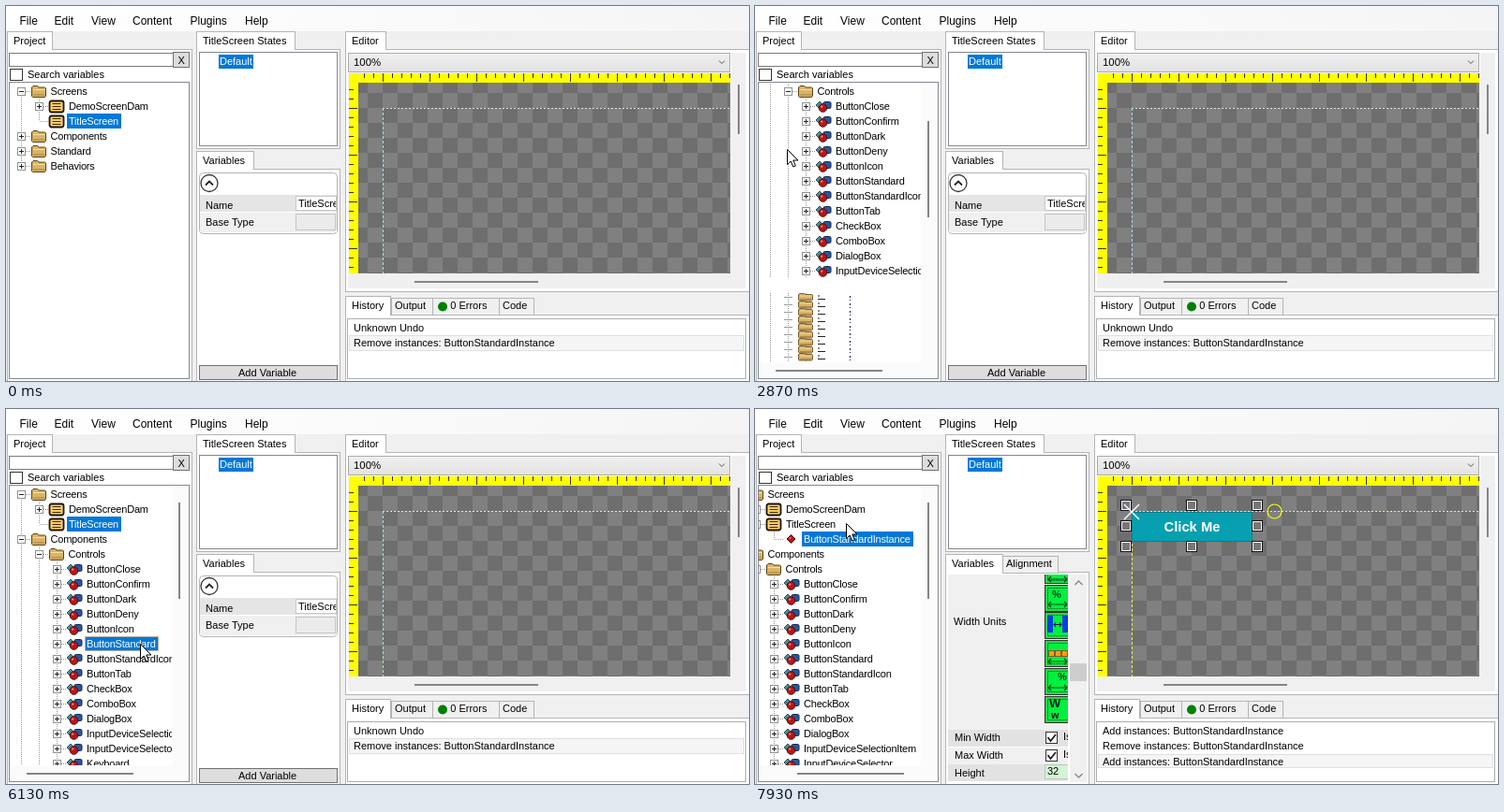
Animation, 793 px wide and 401 px high, one loop 8 s. Source, as an HTML page:

```html
<!DOCTYPE html>
<html lang="en">
<head>
<meta charset="utf-8">
<title>Screen editor</title>
<style>
html,body{margin:0;width:100%;height:100%;overflow:hidden;background:#f0f0f0}
svg{display:block;width:793px;height:401px;font:11px "Liberation Sans",Arial,sans-serif}
text{white-space:pre}
.tree text{letter-spacing:-.2px}
.crisp{shape-rendering:crispEdges}
</style>
</head>
<body>
<svg id="stage" viewBox="0 0 793 401" xmlns="http://www.w3.org/2000/svg"></svg>
<script>
const LOOP = 8000, TICK = 1000 / 15, BLUE = '#0078d7', EDGE = '#b4b4b4';
const stage = document.getElementById('stage');

// Markup helpers
const rect = (x, y, w, h, fill, stroke, extra = '') => stroke
  ? `<rect x="${x + .5}" y="${y + .5}" width="${w - 1}" height="${h - 1}" fill="${fill}" stroke="${stroke}" ${extra}/>`
  : `<rect x="${x}" y="${y}" width="${w}" height="${h}" fill="${fill}" ${extra}/>`;
const text = (x, y, s, fill = '#000', extra = '') => `<text x="${x}" y="${y}" fill="${fill}" ${extra}>${s}</text>`;
const path = (d, stroke, width = 1, extra = '') => `<path d="${d}" fill="none" stroke="${stroke}" stroke-width="${width}" ${extra}/>`;
const clip = (id, x, y, w, h) => `<clipPath id="${id}">${rect(x, y, w, h, '#000')}</clipPath>`;
const repeat = (n, f) => Array.from({length: n}, (_, i) => f(i)).join('');
const layer = (id, extra = '') => `<g id="${id}" ${extra}></g>`;

const tab = (x, y, w, label, active = true) =>
  rect(x, active ? y : y + 2, w, active ? 20 : 19, active ? '#fff' : '#f0f0f0', EDGE) +
  text(x + (active ? 7 : 4), y + 14, label) + (active ? rect(x + 1, y + 18, w - 2, 3, '#fff') : '');
const panel = (x, y, w, h) => rect(x, y, w, h, '#fff', EDGE);

function frameMarkup() {
  const menu = [[14.5, 'File'], [51.5, 'Edit'], [91, 'View'], [135, 'Content'], [196.5, 'Plugins'], [255, 'Help']];
  return rect(0, 0, 793, 401, '#f0f0f0') + rect(0, 0, 793, 27, 'url(#menu)') +
    menu.map(([x, s]) => text(x, 20, s, '#000', 'font-size="12"')).join('') +
    // Project
    panel(1, 46, 198, 356) + tab(1, 27, 49, 'Project') +
    rect(3, 50, 176, 15, '#fff', '#7a7a7a') + rect(178, 49, 18, 17, '#ddd', '#707070') + text(183.5, 61.5, 'X') +
    rect(4, 67, 14, 13, '#fff', '#333') + text(23, 77, 'Search variables') +
    rect(3, 81, 193, 318, '#fff', '#828790') +
    // States
    panel(203, 46, 154, 107) + tab(203, 27, 106, 'TitleScreen States') +
    rect(206, 49, 148, 101, '#fff', '#828790') + rect(227, 52, 37, 15, BLUE) + text(228, 63, 'Default', '#fff') +
    // Variables
    panel(203, 174, 154, 228) + tab(203, 155, 62, 'Variables') + layer('variables') +
    // Editor
    panel(362, 46, 432, 260) + tab(362, 27, 44, 'Editor') +
    rect(365, 72, 425, 230, '#f0f0f0') + rect(774, 50, 16, 22, '#f0f0f0') +
    rect(365, 50, 408, 21, 'url(#combo)', '#acacac') + text(371, 64, '100%', '#000', 'font-size="11.4"') +
    path('M761 58.5l3 3 3-3', '#555') + canvasMarkup() + layer('design') +
    rect(781, 84, 2, 53, '#858585') + rect(436, 294, 132, 2, '#858585') +
    // History
    panel(362, 330, 432, 72) + tab(411, 310, 45, 'Output', false) + tab(455, 310, 72, '     0 Errors', false) +
    tab(526, 310, 38, 'Code', false) + tab(362, 310, 49, 'History') +
    '<circle cx="466" cy="321.500" r="5" fill="#008000"/>' +
    rect(364, 334, 426, 65, '#fff', '#abadb3') + layer('history');
}

function canvasMarkup() {
  const ticks = (n, f) => repeat(n, i => f(i, i % 5 === 2 ? 9 : 5));
  return rect(366, 72, 407, 214, '#ff0') + rect(376, 82, 397, 204, 'url(#checker)') +
    path(ticks(40, (i, len) => `M${382.5 + i * 10} 72v${len}`), '#333', 1, 'class="crisp"') +
    path(ticks(20, (i, len) => `M366 ${89.5 + i * 10}h${len}`), '#333', 1, 'class="crisp"') +
    path('M402 109.500H773', '#dce4e8', 1, 'stroke-dasharray="2 2"');
}

function variablesMarkup(full) {
  if (!full) return rect(206, 178, 148, 66, '#fff', '#b4b4b4', 'rx="4"') +
    rect(207, 202, 146, 18, '#e5e5e5') + rect(207, 221, 146, 21, '#f0f0f0') +
    '<circle cx="217" cy="189.500" r="9" fill="#fff" stroke="#333" stroke-width="1.300"/>' +
    path('M213 191.500l4-4 4 4', '#222', 1.8) +
    text(213, 217, 'Name') + text(213, 235, 'Base Type') +
    rect(309, 203, 44, 16, '#fff', '#c8c8c8') + text(312, 215, 'TitleScreen', '#000', 'clip-path="url(#valueClip)"') +
    rect(309, 222, 43, 18, '#ebebeb', '#c4c4c4') +
    rect(206, 384, 148, 16, '#ddd', '#707070') + text(248, 396, 'Add Variable');
  const button = y => rect(309, y, 30, 29, '#28d848', '#333') +
    rect(312, y + 3, 30, 23, '#00f040', '#067a20', 'stroke-dasharray="2 1"');
  const arrow = y => path(`M313 ${y}H333M316 ${y - 3}l-3 3 3 3M330 ${y - 3}l3 3-3 3`, '#041', 1.2);
  const check = (y, label) => text(213, y + 12, label) + rect(310, y + 2, 13, 13, '#fff', '#333') +
    path(`M312.500 ${y + 8}l3 4 5.500-7`, '#222', 1.8) + text(329, y + 11, 'Is');
  return tab(264, 155, 60, 'Alignment', false) + `<g clip-path="url(#gridClip)">` +
    rect(206, 177, 130, 166, '#f0f0f0') + text(212, 231, 'Width Units') +
    button(158) + button(188) + button(217) + button(247) + button(277) + button(307) +
    arrow(182) + text(317, 202, '%', '#042', 'font-weight="bold"') + arrow(209) +
    rect(312, 221, 6, 18, '#0640e0') + rect(328, 221, 6, 18, '#0640e0') +
    path('M319 230.500h8M321 228l-2 2.500 2 2.500M325 228l2 2.500-2 2.500', '#013') +
    repeat(3, i => rect(313 + i * 7, 258, 7, 7, '#ffa000', '#853')) + arrow(270) +
    text(323, 290, '%', '#042', 'font-weight="bold"') + arrow(298) +
    text(314, 319, 'W', '#021', 'font-weight="bold" font-size="13"') + text(316, 331, 'w', '#021', 'font-weight="bold"') +
    rect(206, 343, 130, 18, '#e2e2e2') + rect(206, 362, 130, 18, '#f0f0f0') + rect(206, 380, 130, 18, '#e2e2e2') +
    check(343, 'Min Width') + check(362, 'Max Width') + text(213, 393, 'Height') +
    rect(309, 380, 28, 16, '#d4f4d4', '#b4c8b4') + text(312, 391, '32') + '</g>' +
    rect(336, 177, 18, 222, '#f0f0f0') + rect(336, 272, 18, 19, '#cdcdcd') +
    path('M341.500 188l4-4 4 4M341.500 390l4 4 4-4', '#888', 1.3);
}

function designMarkup(placed) {
  const guide = path('M402.500 109V286', placed ? '#f0f060' : '#a8dce4', 1, 'stroke-dasharray="3 2"');
  if (!placed) return guide;
  const spots = [[396, 103], [466, 103], [536, 103], [396, 125], [536, 125], [396, 147], [466, 147], [536, 147]];
  return guide + rect(402, 110, 129, 32, '#06a0b0', '#04808e') +
    text(466.5, 131, 'Click Me', '#fff', 'font-size="14.800" font-weight="bold" text-anchor="middle"') +
    spots.map(([x, y]) => rect(x - 6, y - 6, 12, 12, '#111') + rect(x - 5, y - 5, 10, 10, '#777', '#fff')).join('') +
    path('M394 102l16 16M410 102l-16 16', '#fff', 1.4) +
    '<circle cx="554.500" cy="109.500" r="7.500" fill="none" stroke="#ff0" stroke-width="1.200"/>';
}

function historyMarkup(added) {
  const lines = added
    ? [[348, 'Add instances: '], [364, 'Remove instances: '], [381, 'Add instances: ']]
    : [[348, 'Unknown Undo'], [364, 'Remove instances: ']];
  return rect(366, added ? 369 : 352, 422, added ? 15 : 17, '#f5f5f5', '#e0e0e0') +
    lines.map(([y, s]) => text(371, y, s + (s.endsWith(' ') ? 'ButtonStandardInstance' : ''))).join('');
}

// Tree rows: [depth, icon, label, expander]
const controls = ('ButtonClose ButtonConfirm ButtonDark ButtonDeny ButtonIcon ButtonStandard ButtonStandardIcon ' +
  'ButtonTab CheckBox ComboBox DialogBox InputDeviceSelectionItem InputDeviceSelector Keyboard Label ListBox ' +
  'ListBoxItem Menu MenuItem PasswordBox RadioButton Slider').split(' ');
function treeRows({components, open, added}) {
  return [
    [0, 'folder', 'Screens', '-'], [1, 'screen', 'DemoScreenDam', '+'], [1, 'screen', 'TitleScreen', added ? '-' : ''],
    ...(added ? [[2, 'instance', 'ButtonStandardInstance', '']] : []),
    [0, 'folder', 'Components', components ? '-' : '+'],
    ...(components ? [[1, 'folder', 'Controls', open ? '-' : '+']] : []),
    ...(open ? controls.map(c => [2, 'component', c, '+']) : []),
    ...(components ? [[1, 'folder', 'Elements', '+'], [1, 'component', 'InputDevicePanel', '+'], [1, 'component', 'MessageDisplay', '+']] : []),
    [0, 'folder', 'Standard', '+'], [0, 'folder', 'Behaviors', '+']
  ];
}

const folderIcon = '<path d="M.5-4l1.500-1.500h4.500l1.500 1.500h6.500l1 1v8l-1 1.500h-13l-1-1z" fill="#d8b468" stroke="#5a4218"/>' +
  '<path d="M2-1.500h12.500" stroke="#f4e0a0"/><path d="M2 4h12.500" stroke="#a87c38"/>';
const icons = {
  folder: folderIcon,
  screen: '<rect x=".5" y="-5.500" width="15" height="12" rx="2" fill="#fcd068" stroke="#1c1208" stroke-width="1.800"/>' +
    '<path d="M3.500-2.500h9M3.500 .5h9M3.500 3.500h9" stroke="#3a2408" stroke-width="1.200"/>',
  component: '<path d="M0-1l4-4 3 3-4 4z" fill="#489098" stroke="#183840" stroke-width=".800"/>' +
    '<rect x="8" y="-4.500" width="8" height="7" rx="1.500" fill="#2858a0" stroke="#102850"/>' +
    '<circle cx="7.500" cy="2" r="4.300" fill="#b41818" stroke="#500808"/><circle cx="6.200" cy=".6" r="1.200" fill="#f08080"/>',
  instance: '<path d="M3 0l4.500-4.500L12 0 7.500 4.500z" fill="#b41818" stroke="#500808"/><circle cx="6.500" cy="-1" r="1" fill="#f08080"/>'
};
const pen = document.createElement('canvas').getContext('2d');
pen.font = '11px "Liberation Sans",Arial,sans-serif';
const labelWidth = s => pen.measureText(s).width - s.length * .2;

function treeMarkup(s) {
  const rows = treeRows(s), top = 91 - s.scroll * 16;
  const hasNext = (i, depth) => {
    const next = rows.slice(i + 1).find(row => row[0] <= depth);
    return Boolean(next) && next[0] === depth;
  };
  let lines = '', items = '';
  rows.forEach(([depth, icon, label, sign], i) => {
    const y = top + i * 16, x = 16 + depth * 19, tx = x + (icon === 'folder' ? 31.5 : 32);
    if (y < 70 || y > 400) return;
    for (let d = 0; d <= depth; d++) {
      const lx = 16.5 + d * 19, next = hasNext(i, d);
      if (d < depth) lines += next ? `M${lx} ${y - 8}v16` : '';
      else lines += `M${lx} ${i ? y - 8 : y}V${next ? y + 8 : y}M${lx} ${y + .5}h10`;
    }
    if (sign) items += rect(x - 4, y - 4, 9, 9, '#fff', '#919191', 'class="crisp"') +
      path(`M${x - 2} ${y + .5}h5${sign === '+' ? `M${x + .5} ${y - 2}v5` : ''}`, '#223');
    items += `<g transform="translate(${x + 11} ${y})">${icons[icon]}</g>`;
    const selected = label === (s.added ? 'ButtonStandardInstance' : 'TitleScreen') || s.pressed && label === 'ButtonStandard';
    if (selected) items += rect(Math.round(tx - 2), y - 8, Math.round(labelWidth(label) + 5), 16, BLUE,
      label === 'ButtonStandard' && '#f0a050', 'stroke-dasharray="1 1"');
    items += text(tx, y + 4, label, selected ? '#fff' : s.hot === i ? '#0066cc' : '#000', s.hot === i ? 'text-decoration="underline"' : '');
  });
  let out = `<g clip-path="url(#${s.open ? 'treeClip' : 'wideClip'})"><g transform="translate(${s.added ? -34 : 0} 0)">` +
    path(lines, '#999', 1, 'stroke-dasharray="1 1" class="crisp"') + items + '</g>';
  if (s.partial) out += rect(4, 291, 173, 92, '#fff') +
    path('M16.500 307V381M35.500 307V381M54.500 307V381', '#999', 1, 'stroke-dasharray="1 1"') +
    repeat(9, i => {
      const y = 309 + i * 8;
      return path(`M31 ${y + 2.500}h9`, '#999') + `<g transform="translate(46 ${y + 2}) scale(1 .62)">${folderIcon}</g>` +
        path(`M67 ${y + 4.500}h8M68 ${y}v2`, '#222') + rect(101, y + 1, 1, 2, '#115') + rect(101, y + 5, 1, 1, '#115');
    });
  out += '</g>';
  if (!s.open) return out;
  const y = s.scroll ? 123 : 100;
  return out + rect(177, 82, 18, 316, '#fbfbfb') + rect(4, 381, 191, 17, '#fbfbfb') +
    (s.wide ? rect(182, y, 6, 103, '#858585', '', 'rx="3"') + '<path d="M185 88.500l4 6h-8zM185 376l4-6h-8z" fill="#858585"/>'
      : rect(184, y, 2, 103, '#858585')) +
    rect(s.added ? 45 : 22, 389, 114, 2, '#858585');
}

// Pointer stops: [time, x, y, decelerate]
const stops = [[0, 800, 402], [870, 37, 153, 1], [1330, 15, 133], [2000, 15, 133], [2730, 34, 153], [3330, 34, 153],
  [4200, 183, 100], [4330, 185, 103], [4800, 185, 103], [4870, 168, 139], [5600, 137, 245, 1], [5667, 137, 245],
  [5800, 143, 251], [6333, 143, 251], [7000, 101, 131], [7200, 96, 126], [7330, 97, 122], [LOOP, 97, 122]];
function pointerAt(time) {
  const i = Math.max(1, stops.findIndex(s => s[0] >= time));
  const [t0, x0, y0] = stops[i - 1], [t1, x1, y1, decelerate] = stops[i];
  const u = (time - t0) / (t1 - t0), e = decelerate ? 1 - (1 - u) ** 2 : u * u * (3 - 2 * u);
  return [x0 + (x1 - x0) * e, y0 + (y1 - y0) * e];
}

function stateAt(t, [px, py]) {
  const within = (a, b) => t >= a && t < b;
  const s = {
    components: t >= 1600, open: t >= 2870, partial: within(2870, 2930), scroll: within(2870, 4470) ? 4 : 0,
    wide: within(3930, 5270), pressed: within(6130, 6400), added: t >= 7730, hot: -1
  };
  if (t < 6130 && px < 177) {
    const i = Math.floor((py - 83) / 16) + s.scroll, row = treeRows(s)[i];
    if (row && row[2] !== 'TitleScreen') {
      const x = 27 + row[0] * 19;
      if (px >= x && px < x + 21 + labelWidth(row[2])) s.hot = i;
    }
  }
  return s;
}

stage.innerHTML = `<defs>
  <linearGradient id="menu"><stop stop-color="#fff"/><stop offset="1" stop-color="#f5f5f5"/></linearGradient>
  <linearGradient id="combo" x2="0" y2="1"><stop stop-color="#f0f0f0"/><stop offset="1" stop-color="#e2e2e2"/></linearGradient>
  <pattern id="checker" x="402" y="109" width="32" height="32" patternUnits="userSpaceOnUse">
  ${rect(0, 0, 32, 32, '#808080')}${rect(0, 0, 16, 16, '#6e6e6e')}${rect(16, 16, 16, 16, '#6e6e6e')}</pattern>
  ${clip('treeClip', 4, 83, 173, 298)}${clip('wideClip', 4, 83, 191, 314)}
  ${clip('valueClip', 309, 203, 43, 16)}${clip('gridClip', 206, 177, 128, 222)}</defs>` +
  frameMarkup() + layer('tree', 'class="tree"') +
  `<g id="pointer"><path d="M.5.500V16.500L4.200 13 6.800 19 9.300 18 6.800 12H12z" fill="#fff" stroke="#000"/>` +
  `<g id="drag">${rect(5, 14, 12, 10, '#fff', '#000', 'stroke-dasharray="2 1"')}</g></g>`;

const shown = {};
function update(id, key, markup) {
  if (shown[id] === key) return;
  shown[id] = key;
  document.getElementById(id).innerHTML = markup();
}

function render(t) {
  const pos = pointerAt(Math.floor((t + 4) / TICK) * TICK).map(Math.round), s = stateAt(t, pos);
  const filled = t >= 7800, placed = t >= 7860;
  update('tree', JSON.stringify(s), () => treeMarkup(s));
  update('variables', filled, () => variablesMarkup(filled));
  update('design', placed, () => designMarkup(placed));
  update('history', placed, () => historyMarkup(placed));
  document.getElementById('pointer').setAttribute('transform', `translate(${pos})`);
  document.getElementById('drag').setAttribute('display', t >= 6400 && t < 7330 ? 'inline' : 'none');
}

const start = performance.now();
function loop() {
  render((performance.now() - start) % LOOP);
  requestAnimationFrame(loop);
}
render(0);
requestAnimationFrame(loop);
</script>
</body>
</html>
```
